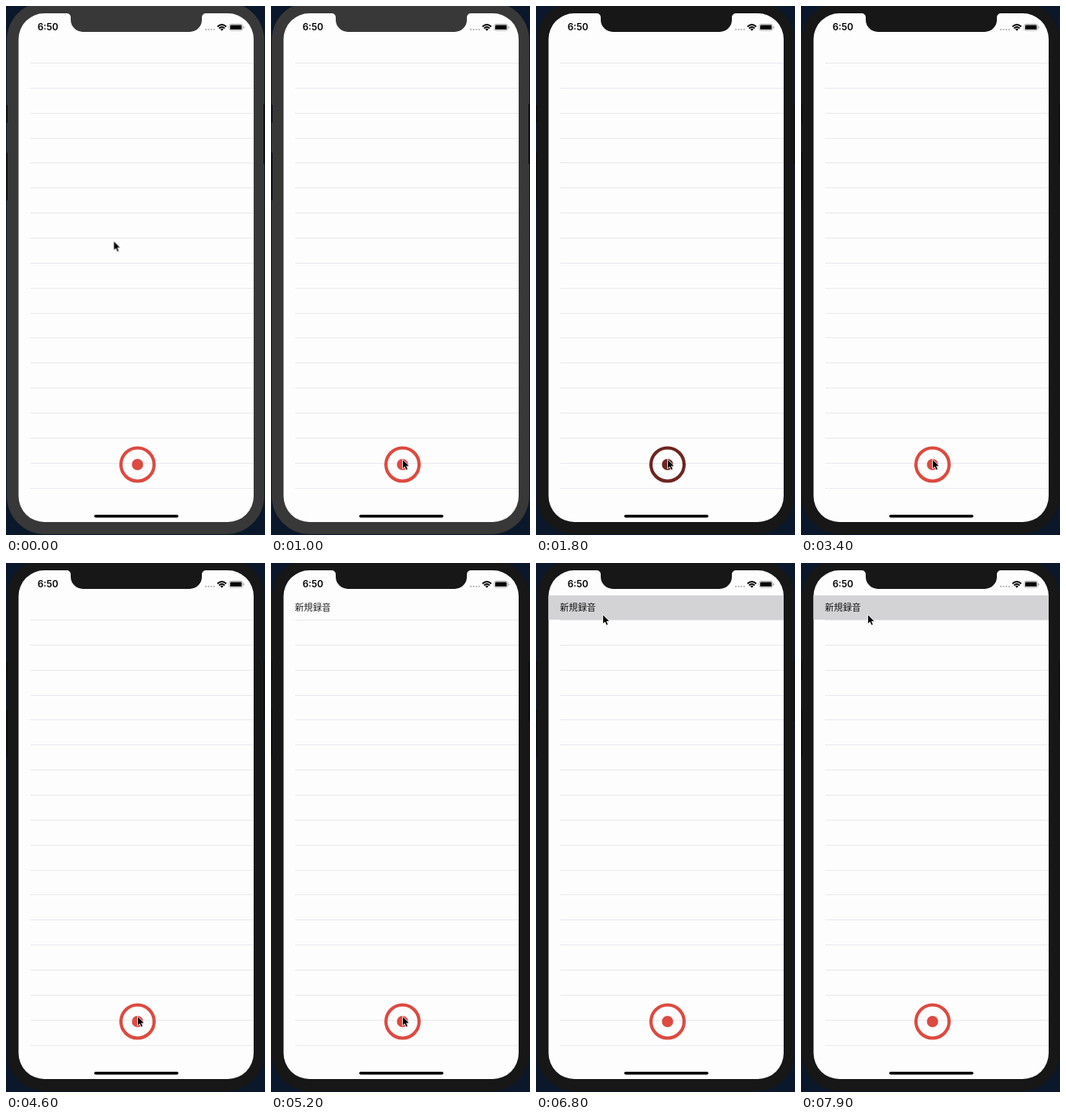
An HTML page for the animation above (8000 ms loop, 320 by 653 pixels).

```html
<!DOCTYPE html>
<html lang="ja">
<head>
<meta charset="utf-8">
<title>Voice recorder</title>
<style>
  html, body { margin: 0; width: 100%; height: 100%; overflow: hidden; background: #0b172b; }
  svg { display: block; width: 100%; height: 100%; }
  .clock { font: 600 11.5px Inter, sans-serif; }
  .title { font: 400 11.1px "Noto Sans CJK JP", "Noto Sans CJK", sans-serif; fill: #141414; }

  .bezel, .record, .title, .highlight, .cursor { animation: 8s -20ms infinite step-end; }
  .bezel { animation-name: dim; }
  .record { animation-name: press; }
  .title { animation-name: appear; }
  .highlight { animation-name: select; }
  .cursor { animation-name: point; }

  @keyframes dim {
    0% { fill: #383838; }
    22.5%, 100% { fill: #171717; }
  }
  @keyframes press {
    0%, 23.75%, 61.25%, 100% { color: #dc4a40; }
    22.5%, 58.75% { color: #6e2520; }
  }
  @keyframes appear {
    0% { opacity: 0; }
    61.25% { opacity: 0; animation-timing-function: ease-out; }
    66.25%, 100% { opacity: 1; }
  }
  @keyframes select {
    0% { opacity: 0; }
    85%, 100% { opacity: 1; }
  }
  @keyframes point {
    0% { transform: translate(132.5px, 289.5px); }
    3.75% { transform: translate(132.5px, 289.5px); animation-timing-function: ease-in-out; }
    10% { transform: translate(162px, 559px); }
    66.25% { transform: translate(162px, 559px); animation-timing-function: ease-in-out; }
    77.5%, 100% { transform: translate(82px, 63px); }
  }
</style>
</head>
<body>
<svg viewBox="0 0 320 653" preserveAspectRatio="none">
  <rect class="bezel" x="1" y="-5" width="318" height="657" rx="47"/>
  <path d="M0 122h2v22h-2zM0 181h2v59h-2zM318 121h2v74h-2z" fill="#0c0f16"/>

  <path fill="#fdfdfd" d="M47.5 9H75A5 5 0 0 1 80 14V17A15 15 0 0 0 95 32H227A15 15 0 0 0 242 17V14
    A5 5 0 0 1 247 9H274A32 32 0 0 1 306 41V605A32 32 0 0 1 274 637H47.5
    A32 32 0 0 1 15.5 605V41A32 32 0 0 1 47.5 9Z"/>

  <rect class="highlight" x="15.5" y="40" width="290.5" height="30" fill="#d3d3d5"/>
  <g id="lines" fill="#e9e9ef"></g>
  <text class="title" x="29.5" y="58.8">新規録音</text>

  <text class="clock" x="39" y="30.3">6:50</text>
  <path d="M246 29h12.5" stroke="#bdbdbd" stroke-width="1.8" stroke-dasharray="1.9 1.5"/>
  <g fill="none" stroke="#000" stroke-width="1.8">
    <path d="M261.3 25.5Q266.7 20.6 272.1 25.5M263.2 27.6Q266.7 24.4 270.2 27.6"/>
    <path d="M264.7 28.6Q266.7 27 268.7 28.6L266.7 30.8Z" fill="#000" stroke="none"/>
  </g>
  <rect x="275.9" y="22.4" width="16.4" height="7.8" rx="2.2" fill="none" stroke="#999" stroke-width=".8"/>
  <rect x="277" y="23.5" width="14.2" height="5.6" rx="1.2"/>
  <path d="M293.3 25v2.8q1.2-.4 1.2-1.4t-1.2-1.4" fill="#999"/>

  <g class="record">
    <circle cx="162.5" cy="566" r="20.5" fill="none" stroke="currentColor" stroke-width="4"/>
    <circle cx="162.5" cy="566" r="7" fill="currentColor"/>
  </g>
  <rect x="109" y="628" width="104" height="3.6" rx="1.8"/>
  <path class="cursor" d="M.5.5V12.3L3.2 9.8 5 14 7.2 13 5.4 9H9Z" stroke="#fdfdfd" stroke-width=".8"/>
</svg>
<script>
  const lines = document.getElementById("lines");
  for (let row = 0; row < 18; row++) {
    const line = document.createElementNS(lines.namespaceURI, "rect");
    const box = { x: 30, y: Math.round(70 + row * 30.86), width: 276, height: 1 };
    for (const key in box) line.setAttribute(key, box[key]);
    lines.append(line);
  }
</script>
</body>
</html>
```
